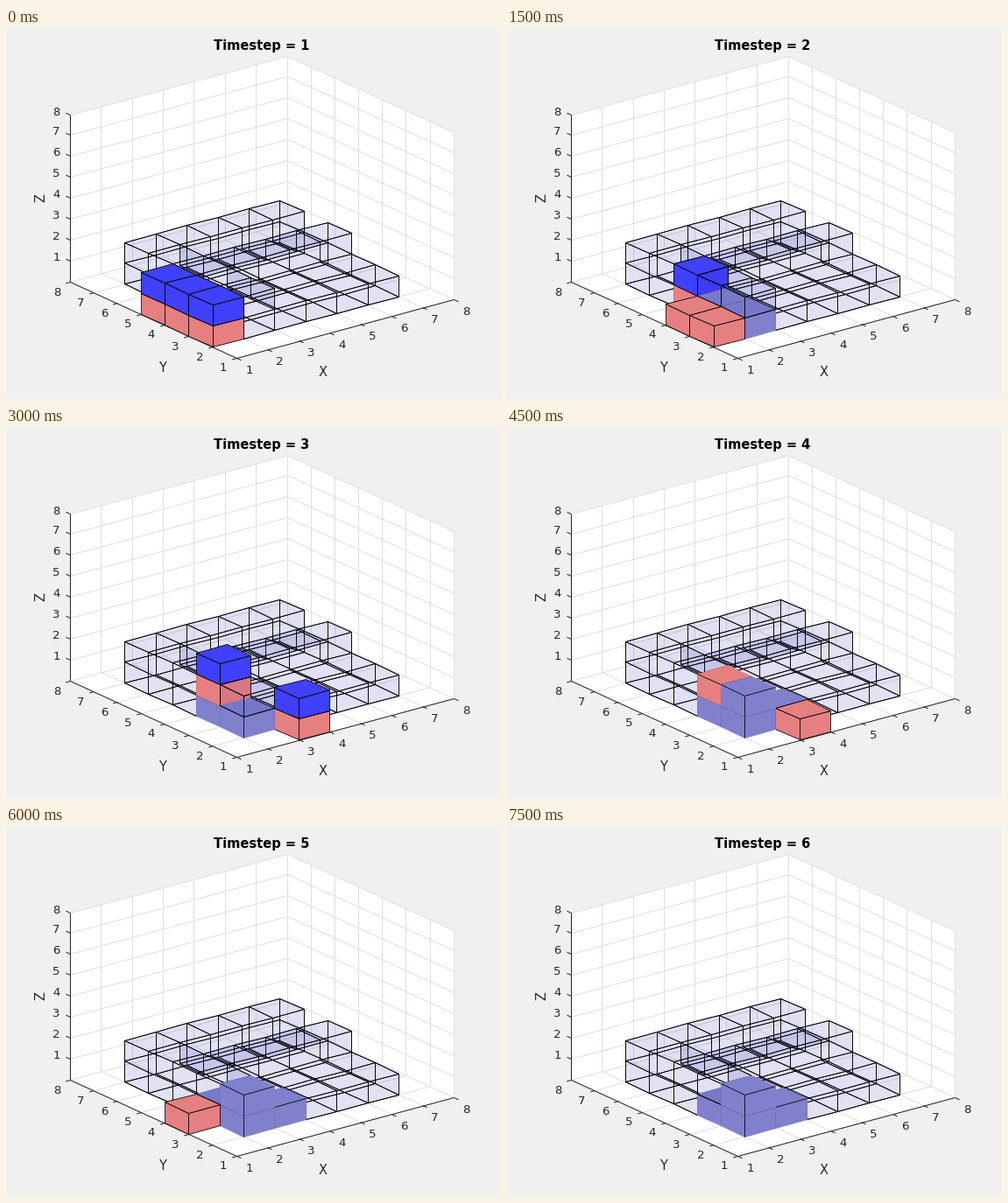
Animation of 565 by 424 pixels, one loop 8000 ms. Source, as a matplotlib script:

```python
import numpy as np
import matplotlib.pyplot as plt
from matplotlib.animation import FuncAnimation
from matplotlib.collections import LineCollection, PolyCollection

W, H, DPI = 565, 424, 100
PX = 72 / DPI  # points per pixel

# Screen vectors of one unit along each axis (y runs downwards)
ORIGIN = np.array([263.25, 377.0])
UX = np.array([248, -67]) / 7
UY = np.array([-190, -87]) / 7
UZ = np.array([0, -191]) / 8

RED = (0.9, 0.5, 0.5, 1)
BLUE = (0.25, 0.25, 1, 1)
FILLED = (0.5, 0.5, 0.8, 1)
GHOST = (0, 0, 0.6, 0.06)
BLACK = (0, 0, 0, 1)
INK = "#262626"

# (axis, side) of the cube faces turned from and towards the viewer
HIDDEN = [(0, 1), (1, 1), (2, 0)]
VISIBLE = [(0, 0), (1, 0), (2, 1)]


def cells(text):
    return [tuple(map(int, word)) for word in text.split()]


# A square slab with a raised letter F
SHAPE = {(x, y, z) for x in range(2, 7) for y in range(2, 7) for z in (0, 1)
         if z == 0 or x == 2 or y in (4, 6)}
BUILD_ORDER = cells("220 230 221 320")
# Per timestep: robots as xyz digits, how many are loaded, blocks built
STEPS = [
    ("120 130 140", 3, 0),
    ("240 120 130", 1, 2),
    ("231 310", 2, 2),
    ("231 310", 0, 4),
    ("130", 0, 4),
    ("", 0, 4),
]


def project(x, y, z):
    return ORIGIN + (x - 1) * UX + (y - 1) * UY + z * UZ


def pixel(x, y, z):
    """Projected point, moved to the centre of its pixel."""
    return np.floor(project(x, y, z)) + 0.5


def face(cell, axis, side):
    square = [(0, 0), (1, 0), (1, 1), (0, 1)]
    return [pixel(*np.add(cell, np.insert(c, axis, side))) for c in square]


def neighbour(cell, axis, side):
    moved = list(cell)
    moved[axis] += 2 * side - 1
    return tuple(moved)


def inner_edges(cell):
    """The three edges that meet at the corner nearest the viewer."""
    near = pixel(*np.add(cell, (0, 0, 1)))
    return [[near, pixel(*np.add(cell, end))]
            for end in ((1, 0, 1), (0, 1, 1), (0, 0, 0))]


def scene(robots, loaded, built):
    """Polygons with fill and edge colours, from back to front."""
    robots = cells(robots)
    colors = dict.fromkeys(SHAPE, GHOST)
    colors.update(dict.fromkeys(BUILD_ORDER[:built], FILLED))
    colors.update(dict.fromkeys(robots, RED))
    colors.update({(x, y, z + 1): BLUE for x, y, z in robots[:loaded]})

    polys, fills, edges = [], [], []
    for cell in sorted(colors, key=lambda c: (-c[0], -c[1], c[2])):
        color = colors[cell]
        if color == GHOST:
            sides = [s for s in HIDDEN + VISIBLE
                     if neighbour(cell, *s) not in SHAPE]
        else:
            sides = VISIBLE
        embedded = cell in SHAPE and color in (RED, FILLED)
        polys += [face(cell, *s) for s in sides]
        fills += [color] * len(sides)
        edges += [color if embedded else BLACK] * len(sides)
        if embedded:
            polys += inner_edges(cell)
            fills += [color] * 3
            edges += [BLACK] * 3
    return polys, fills, edges


fig = plt.figure(figsize=(W / DPI, H / DPI), dpi=DPI, facecolor="#f0f0f0")
ax = fig.add_axes([0, 0, 1, 1])
ax.set_xlim(0, W)
ax.set_ylim(H, 0)
ax.axis("off")


def lines(segments, color, zorder):
    ax.add_collection(LineCollection(segments, colors=color, linewidths=PX,
                                     snap=False, zorder=zorder))


def label(x, y, text, size=10, **kw):
    return ax.text(x, y, text, fontsize=size * 96 / DPI, ha="center",
                   va="baseline", family="DejaVu Sans", **{"color": INK, **kw})


def draw_axes():
    hull = [(1, 1, 0), (8, 1, 0), (8, 1, 8), (8, 8, 8), (1, 8, 8), (1, 8, 0)]
    ax.add_collection(PolyCollection([[pixel(*p) for p in hull]],
                                     facecolors="white", zorder=0))
    grid, ticks = [], []
    out_y = UY / np.hypot(*UY) * 5.5
    out_x = UX / np.hypot(*UX) * 5.5
    for n in range(1, 9):
        grid += [
            [pixel(n, 1, 0), pixel(n, 8, 0)], [pixel(n, 8, 0), pixel(n, 8, 8)],
            [pixel(1, n, 0), pixel(8, n, 0)], [pixel(8, n, 0), pixel(8, n, 8)],
            [pixel(1, 8, n), pixel(8, 8, n)], [pixel(8, 1, n), pixel(8, 8, n)],
        ]
        for point, out, shift in (
            (pixel(n, 1, 0), -out_y, (14, 17.5)),
            (pixel(1, n, 0), -out_x, (-15.5, 15)),
            (pixel(1, 8, n), out_y, (-16, 0)),
        ):
            ticks.append([point, point + out])
            label(*(point + shift), str(n))
    lines(grid, "#dfdfdf", 1)
    spine = [pixel(8, 1, 0), pixel(1, 1, 0), pixel(1, 8, 0), pixel(1, 8, 8)]
    lines(list(zip(spine, spine[1:])) + ticks, INK, 2)
    label(362, 398, "X", 11)
    label(178, 393, "Y", 11)
    label(44.5, 194, "Z", 11, rotation=90, rotation_mode="anchor")


draw_axes()
title = label(291.5, 25, "", 11, weight="bold", color="black")
blocks = PolyCollection([], linewidths=0.8 * PX, joinstyle="round",
                        snap=False, zorder=3)
ax.add_collection(blocks)

SCENES = [scene(*step) for step in STEPS]


def update(i):
    step = i // 3  # each timestep lasts three ticks of 500 ms
    polys, fills, edges = SCENES[step]
    blocks.set_verts(polys)
    blocks.set_facecolor(fills)
    blocks.set_edgecolor(edges)
    title.set_text(f"Timestep = {step + 1}")
    return blocks, title


anim = FuncAnimation(fig, update, frames=16, interval=500, repeat=True,
                     init_func=lambda: update(0))
plt.show()
```
